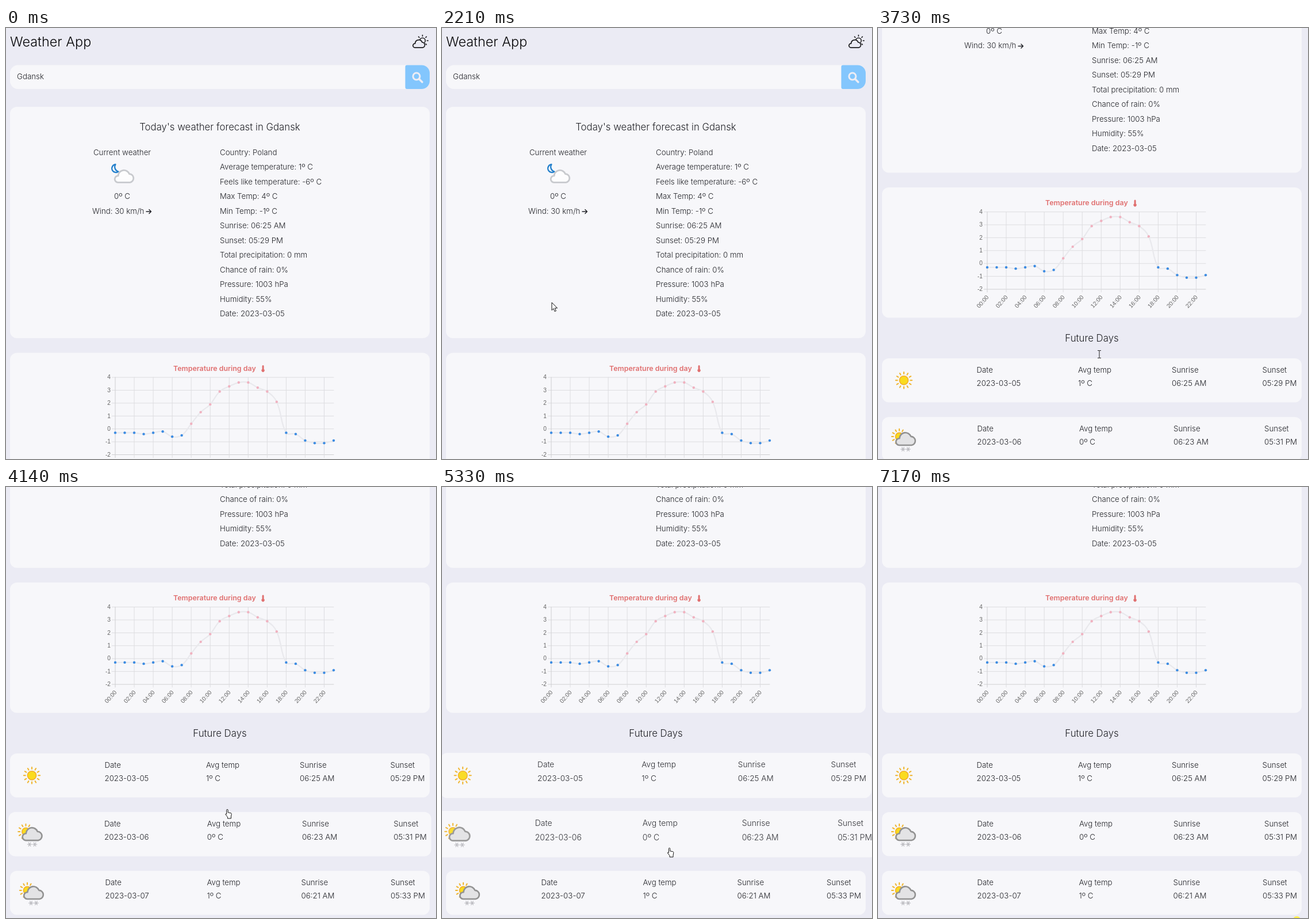
Recreate the animation shown at these times as an HTML page. Size 748 by 749 pixels, loop 7.24 s.

```html
<!DOCTYPE html>
<html lang="en">
<head>
<meta charset="utf-8">
<title>Weather App</title>
<style>
  html, body { margin: 0; width: 100%; height: 100%; overflow: hidden; background: #ebebf4; }
  svg { display: block; width: 100%; height: 100%; }
  text { font: 350 13.3px Inter, "Open Sans", sans-serif; fill: #222328; white-space: pre; }
  .h1 { font-size: 23.4px; fill: #08080a; }
  .h2 { font-size: 16.8px; }
  .mid { text-anchor: middle; }
  .label { font: 600 12.4px Inter, sans-serif; fill: #e07070; }
  .tick { font: 10.2px "Liberation Sans", Arial, sans-serif; fill: #666; text-anchor: end; }
  .card { fill: #f7f7fa; }
  .line { fill: none; stroke-linecap: round; stroke-linejoin: round; }
  .cursor { fill: #fff; stroke: #111; stroke-width: 1; }
</style>
</head>
<body>
<svg id="stage" viewBox="0 0 748 749"></svg>
<script>
const LOOP = 7240, END = 398.5;
const CLOUD = 'M6.5 24a6 6 0 0 1 .5-12a10.5 10.5 0 0 1 20.3-3.5a7.8 7.8 0 0 1 1.2 15.5z';

const text = (x, y, s, cls = '') => `<text x="${x}" y="${y}" class="${cls}">${s}</text>`;
const path = (d, stroke, width, fill = 'none', more = '') =>
  `<path d="${d}" class="line" style="fill:${fill}" stroke="${stroke}" stroke-width="${width}" ${more}/>`;
const card = (y, h) => `<rect class="card" x="7" y="${y}" width="730" height="${h}" rx="12"/>`;
const cloud = (x, y, k, stroke, width, fill) =>
  path(CLOUD, stroke, width / k, fill, `transform="translate(${x} ${y}) scale(${k})"`);

// n strokes around a point, from radius a to radius b
function rays(x, y, n, a, b, stroke, width) {
  let d = '';
  for (let i = 0; i < n; i++) {
    const c = Math.cos(i * 2 * Math.PI / n), s = Math.sin(i * 2 * Math.PI / n);
    d += `M${x + a * c} ${y + a * s}L${x + b * c} ${y + b * s}`;
  }
  return path(d, stroke, width);
}
const sun = (x, y, r) =>
  `<circle cx="${x}" cy="${y}" r="${r}" fill="#fadb1e" stroke="#f2b02c" stroke-width="1.6"/>` +
  rays(x, y, 12, r + 3.6, r + 6.6, '#f0b42c', 2);
const snowy = y =>
  sun(37, y - 4, 6.6) + cloud(30.5, y - 12.5, 0.98, '#929292', 2.6, '#e3e3e5') +
  rays(43.5, y + 18, 6, 0, 3.6, '#bdbdc2', 1.3) + rays(52.5, y + 18, 6, 0, 3.6, '#bdbdc2', 1.3);

function header() {
  return text(7, 32, 'Weather App', 'h1') +
    rays(724.5, 22, 8, 7.8, 9.8, '#1c1c1e', 1.6) +
    '<circle cx="724.5" cy="22" r="4.8" fill="none" stroke="#1c1c1e" stroke-width="1.6"/>' +
    cloud(707.5, 19.7, 0.6, '#1c1c1e', 1.8, '#ebebf4') +
    '<rect class="card" x="7" y="64.5" width="730" height="41.5" rx="14"/>' +
    text(19, 88.7, 'Gdansk') +
    '<path fill="#83c6fd" d="M697.5 64.5h25.5a14 14 0 0 1 14 14v13.5a14 14 0 0 1-14 14h-25.5a3 3 0 0 1-3-3v-35.5a3 3 0 0 1 3-3z"/>' +
    '<circle cx="714" cy="84" r="6" fill="none" stroke="#ededf5" stroke-width="3"/>' +
    path('M719 89l5 5', '#ededf5', 3.4);
}

function today() {
  const row = i => 220.8 + 25.5 * i;
  const facts = ['Country: Poland', 'Average temperature: 1º C', 'Feels like temperature: -6º C',
    'Max Temp: 4º C', 'Min Temp: -1º C', 'Sunrise: 06:25 AM', 'Sunset: 05:29 PM',
    'Total precipitation: 0 mm', 'Chance of rain: 0%', 'Pressure: 1003 hPa', 'Humidity: 55%',
    'Date: 2023-03-05'];
  return card(137, 402) +
    text(372, 178, "Today's weather forecast in Gdansk", 'h2 mid') +
    text(202, row(0), 'Current weather', 'mid') +
    path('M190.5 237a7 7 0 1 0 5 12.5a8.3 8.3 0 0 1-5-12.5z', '#2480cc', 2.3) +
    cloud(188.5, 245.5, 0.95, '#c8cace', 2.8, '#fdfdfe') +
    text(202, row(3), '0º C', 'mid') + text(150, row(4), 'Wind: 30 km/h') +
    path('M244 319h8.5m-3.6-3.6l3.6 3.6l-3.6 3.6', '#222328', 1.4) +
    facts.map((s, i) => text(372, row(i), s)).join('');
}

function chart() {
  const temps = [-.3, -.3, -.3, -.4, -.3, -.2, -.6, -.5, .4, 1.3, 1.9, 2.9,
    3.3, 3.6, 3.6, 3.2, 2.9, 2.1, -.3, -.4, -.9, -1.1, -1.1, -.9];
  const px = i => 190 + i * 380 / 23, py = v => 696.7 - 22.4 * v;
  const pts = temps.map((v, i) => [px(i), py(v)]);
  let out = card(564.5, 226.5) + text(291, 595.5, 'Temperature during day', 'label') +
    '<path fill="#e07070" d="M445.6 587.5a1.5 1.5 0 0 1 3 0v5.6a2.6 2.6 0 1 1-3 0z"/>';
  for (let v = -2; v <= 4; v++)
    out += path(`M184.5 ${py(v)}H570`, v === -2 ? '#cfcfd1' : '#dddde0', 1) +
      text(182, py(v) + 3.2, v, 'tick');
  for (let i = 0; i < 24; i += 2)
    out += path(`M${px(i)} 607V746.5`, i ? '#dddde0' : '#cfcfd1', 1) +
      `<text class="tick" dy=".35em" transform="translate(${px(i) + .5} 753.5) rotate(-48)">${String(i).padStart(2, 0)}:00</text>`;

  // smooth line with tension 0.4
  const handles = pts.map((p, i) => {
    const a = pts[i - 1] || p, b = pts[i + 1] || p;
    const da = Math.hypot(p[0] - a[0], p[1] - a[1]), db = Math.hypot(b[0] - p[0], b[1] - p[1]);
    const at = k => [p[0] + k * (b[0] - a[0]), p[1] + k * (b[1] - a[1])];
    return [at(-.4 * da / (da + db)), at(.4 * db / (da + db))];
  });
  let d = 'M' + pts[0];
  for (let i = 1; i < 24; i++) d += `C${handles[i - 1][1]} ${handles[i][0]} ${pts[i]}`;
  out += path(d, '#e9e9ed', 2.2);
  pts.forEach(([x, y], i) =>
    out += `<circle cx="${x}" cy="${y}" r="2.2" fill="${temps[i] < 0 ? '#3b8be2' : '#f0b2c0'}"/>`);
  return out;
}

const days = [
  ['2023-03-05', '1º C', '06:25 AM', '05:29 PM', [171.5, 348, 511, 668.5]],
  ['2023-03-06', '0º C', '06:23 AM', '05:31 PM', [172.5, 350, 514, 672]],
  ['2023-03-07', '1º C', '06:21 AM', '05:33 PM', [172.5, 349.5, 513.5, 669]]
];
const dayTop = i => END + 463 + 102 * i;

function future() {
  return text(372, 832, 'Future Days', 'h2 mid') + days.map((day, i) => {
    const y = dayTop(i);
    const cells = ['Date', 'Avg temp', 'Sunrise', 'Sunset'].map((name, c) =>
      text(day[4][c], y + 24.7, name) + text(day[4][c], y + 48, day[c])).join('');
    return `<g class="day">${card(y, 76.5)}<g>${i ? snowy(y + 38) : sun(45, y + 38.3, 7.6)}${cells}</g></g>`;
  }).join('');
}

const stage = document.getElementById('stage');
stage.innerHTML = `<g id="page">${header()}${today()}${chart()}${future()}</g>
  <g id="pointer">
    <path class="cursor" d="M0 0v13.5l3-2.9l2.1 5l2.3-1l-2.1-4.8h4.3z"/>
    <path class="line" stroke="#222" d="M-2.5-6.5h2l.5.5l.5-.5h2M0-6v12M-2.5 6.5h2l.5-.5l.5.5h2"/>
    <path class="cursor" d="M-1 1a1.2 1.2 0 0 1 2.4 0v4.2l5 .9q1.2.4 1.1 1.8l-.8 4.6v3h-6v-2.5l-3.8-4.8q.6-1.6 2.1-.1z"/>
  </g>
  <circle id="spot" cx="728.5" cy="753" r="7" fill="#fff04a"/>`;

const page = document.getElementById('page'), pointer = document.getElementById('pointer');
const spot = document.getElementById('spot');
const dayCards = [...document.querySelectorAll('.day')];

const scrollKeys = [[2800, 0], [3260, 159.3], [3730, 287.5], [3940, END]];
const pointerKeys = [[530, 714, 726], [1230, 154, 120], [1300, 135, 116], [1580, 85, 200],
  [2000, 132, 397], [2210, 191, 477], [2770, 307, 514], [3260, 371, 545], [3730, 385, 567],
  [4110, 385, 567], [4700, 380, 439], [4840, 381, 429], [5420, 398, 664], [5880, 422, 739],
  [6350, 440, 756]];
const hovers = [[[4260, 4640], [4920, 5110]], [[4110, 4160], [5170, 5370]], [[5400, 6430]]];

const clamp = x => Math.min(1, Math.max(0, x));
const ease = x => 1 - (1 - clamp(x) ** 1.3) ** 3;

function along(keys, t) {
  let i = 1;
  while (i < keys.length - 1 && t > keys[i][0]) i++;
  const a = keys[i - 1], b = keys[i], k = clamp((t - a[0]) / (b[0] - a[0]));
  return a.slice(1).map((v, n) => v + k * (b[n + 1] - v));
}

function tick(t) {
  const base = [5880, 4140, 3520, 530].find(s => t >= s) || 0;
  return base ? base + Math.floor((t - base) / 70) * 70 : 0;
}

function draw(now) {
  const raw = now % LOOP, t = tick(raw);
  page.setAttribute('transform', `translate(0 ${-along(scrollKeys, t)[0]})`);
  dayCards.forEach((g, i) => {
    const h = clamp(hovers[i].reduce((sum, [on, off]) =>
      sum + ease((t - on) / 500) - ease((t - off) / 500), 0));
    const cy = dayTop(i) + 38.25;
    g.setAttribute('transform', `translate(372 ${cy}) scale(${1 + .1 * h}) translate(-372 ${-cy})`);
    g.lastChild.setAttribute('opacity', 1 - .17 * h);
  });

  const over = hovers.some(list => list.some(([on, off]) => t >= on && t < off));
  const shape = over ? 2 : t >= 3590 && t < 4140 ? 1 : 0;
  [...pointer.children].forEach((p, i) => p.style.display = i === shape ? '' : 'none');
  pointer.setAttribute('transform', `translate(${along(pointerKeys, t)})`);
  pointer.style.display = t >= 530 && t < 6400 ? '' : 'none';
  spot.style.display = raw >= 7170 ? '' : 'none';
}

const start = performance.now();
function loop() {
  draw(performance.now() - start);
  requestAnimationFrame(loop);
}
loop();
</script>
</body>
</html>
```
